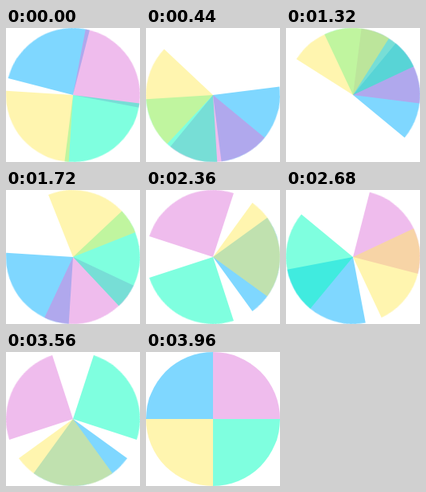
Write an HTML page that moves like this. It is 168 px wide and 168 px high and loops after 4000 ms.

```html
<!DOCTYPE html>
<html lang="en">
<head>
<meta charset="utf-8">
<title>Turning quarters</title>
<style>
  html, body { margin: 0; width: 100%; height: 100%; overflow: hidden; background: #fff; }
  svg { display: block; width: 100vw; height: 100vh; }
  path {
    fill-opacity: .5;
    /* the small lead keeps each step safely inside its 40 ms slot */
    animation: turn 4s steps(100, jump-start) -8ms infinite;
  }
  .blue   { fill: #00b0ff; --from: 270deg; --turns: 4; }
  .pink   { fill: #df7bdb; --from: 0deg;   --turns: 3; }
  .aqua   { fill: #00ffbf; --from: 90deg;  --turns: 2; }
  .yellow { fill: #ffeb61; --from: 180deg; --turns: 1; }
  @keyframes turn {
    from { transform: rotate(var(--from)); }
    to   { transform: rotate(calc(var(--from) + var(--turns) * 360deg)); }
  }
</style>
</head>
<body>
<svg viewBox="-84 -84 168 168">
  <path class="blue" d="M0 0V-84A84 84 0 0 1 84 0Z"/>
  <path class="pink" d="M0 0V-84A84 84 0 0 1 84 0Z"/>
  <path class="aqua" d="M0 0V-84A84 84 0 0 1 84 0Z"/>
  <path class="yellow" d="M0 0V-84A84 84 0 0 1 84 0Z"/>
</svg>
</body>
</html>
```
